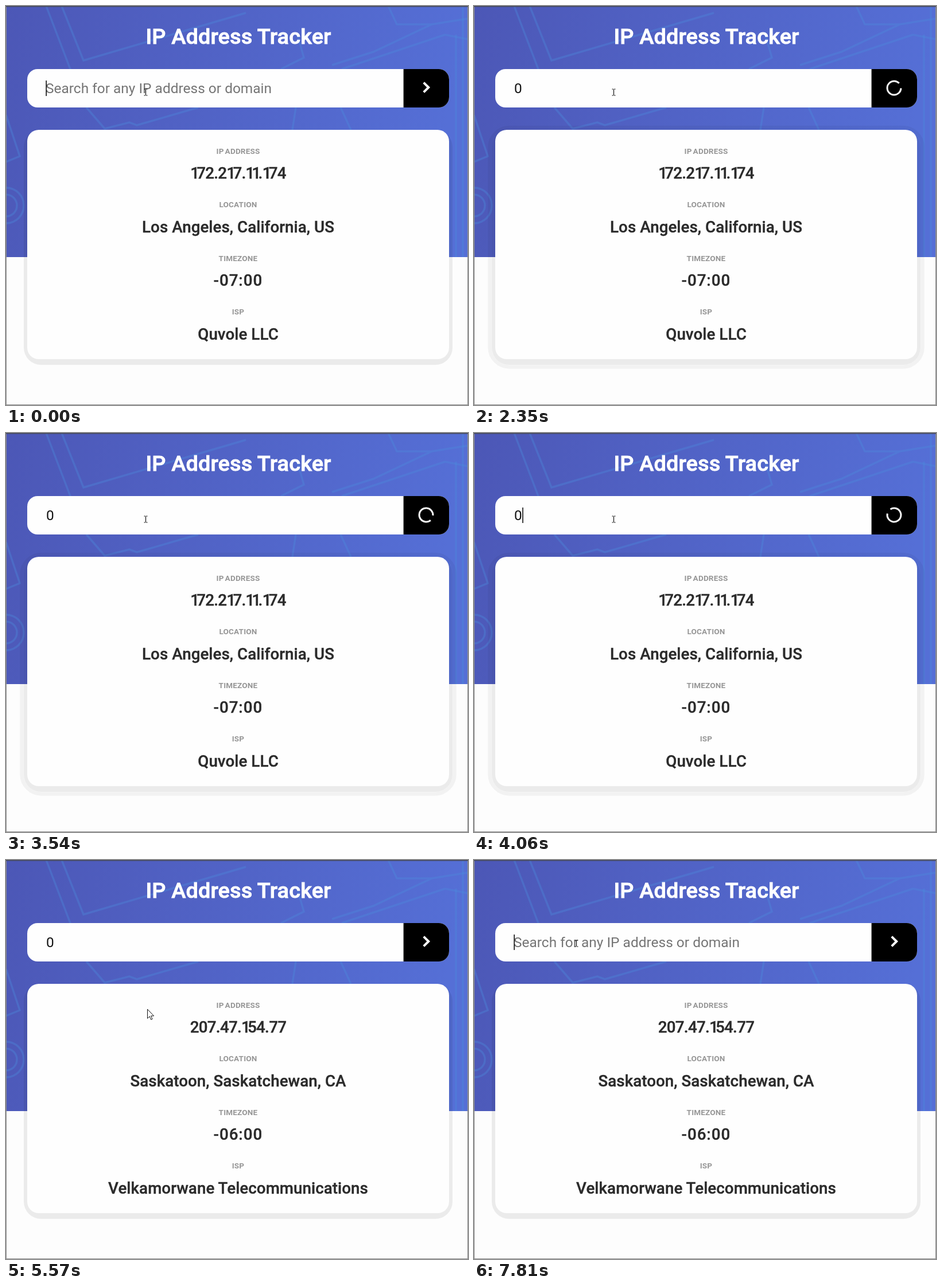
These frames come from a looping animation (805x696 px, 8000 ms). An HTML page:

```html
<!DOCTYPE html>
<html lang="en">
<head>
<meta charset="utf-8">
<title>IP Address Tracker</title>
<style>
html, body { margin: 0; width: 100%; height: 100%; overflow: hidden; background: #fdfdfd; }
svg { display: block; width: 805px; height: 696px; font-family: Roboto, Arial, sans-serif; }
.mid { text-anchor: middle; }
.title { font-size: 37.8px; font-weight: 500; letter-spacing: .15px; fill: #fff; stroke: #fff; stroke-width: .9px; }
.label { font-size: 13.5px; font-weight: 700; letter-spacing: .2px; word-spacing: -1.5px; fill: #969696; }
.value { font-size: 27.7px; font-weight: 500; letter-spacing: .08px; fill: #2b2b2b; stroke: #2b2b2b; stroke-width: .4px; }
.ip { letter-spacing: -.7px; }
.ip .one { letter-spacing: -.17em; }
.zone { letter-spacing: 1px; }
.field { font-size: 24.4px; letter-spacing: .03px; }
.map { fill: none; stroke: #4c8cdc; stroke-width: 3.5; stroke-opacity: .36; }
</style>
</head>
<body>
<svg viewBox="0 0 805 696">
  <defs>
    <linearGradient id="sky" x2="1" y2=".12">
      <stop offset="0" stop-color="#4c57b6"/>
      <stop offset=".35" stop-color="#5060c2"/>
      <stop offset="1" stop-color="#556fd6"/>
    </linearGradient>
  </defs>
  <rect width="805" height="696" fill="#fdfdfd"/>
  <rect width="805" height="438" fill="url(#sky)"/>
  <g class="map">
    <path d="M70 0L112 110M97 0L135 95L418 12M507 48L519 90L479 110"/>
    <path d="M0 190L24 262L0 272M140 177L172 214L215 203L228 208L335 177"/>
    <path d="M505 177L499 216M583 177L601 216"/>
    <path d="M568 103L640 80L742 32L805 22M585 110L765 50L805 58M666 0L681 32L742 32"/>
    <path d="M784 50V438M796 0V438"/>
    <circle cy="348" r="31"/>
    <circle cy="348" r="19"/>
  </g>

  <rect x="31" y="216" width="747" height="410" rx="30" fill-opacity=".07"/>
  <rect id="halo" x="27.5" y="212" width="754" height="417.5" rx="34"
        fill="none" stroke="#000" stroke-width="6.5" stroke-opacity=".045"/>
  <rect x="37" y="216" width="735" height="400" rx="20" fill="#fefefe"/>
  <text class="mid title" x="405" y="66">IP Address Tracker</text>
  <g id="card"></g>

  <rect x="37" y="110" width="735" height="67" rx="18" fill="#fefefe"/>
  <path d="M692.6 110H754A18 18 0 0 1 772 128V159A18 18 0 0 1 754 177H692.6Z"/>
  <path id="arrow" d="M727.8 133.6L736.2 142L727.8 150.4" fill="none" stroke="#fff" stroke-width="4"/>
  <circle id="ring" cx="732" cy="143" r="12" fill="none" stroke="#f4f4f4" stroke-width="3"
          pathLength="360" stroke-dasharray="315 45"/>
  <text id="hint" class="field" x="69" y="152" fill="#757575">Search for any IP address or domain</text>
  <text id="typed" class="field" x="70" y="152" fill="#111">0</text>
  <rect id="caret" y="130" width="1.5" height="27"/>

  <path d="M.5 0V696M804.5 0V696M0 695.5H805" stroke="#8c8c8c"/>
  <rect width="805" height="1.6" fill="#464a5c"/>

  <g id="mouse">
    <path id="beam" d="M-3-5.5H-.5M.5-5.5H3M0-5V5M-3 5.5H-.5M.5 5.5H3" stroke="#111" stroke-width="1.2"/>
    <path id="tip" d="M.5.5V16.5L4.2 13L6.6 18.6L9 17.6L6.6 12.1H11.6Z" fill="#fff" stroke="#111"/>
  </g>
</svg>
<script>
const $ = id => document.getElementById(id);
const LOOP = 8000, TYPED = 1590, SEND = 2350, DONE = 4420, CLEARED = 7490;
const STEP = 87;

const rows = [
  { label: 'IP ADDRESS', kind: 'ip', before: '172.217.11.174', after: '207.47.154.77' },
  { label: 'LOCATION', kind: '', before: 'Los Angeles, California, US', after: 'Saskatoon, Saskatchewan, CA' },
  { label: 'TIMEZONE', kind: 'zone', before: '-07:00', after: '-06:00' },
  { label: 'ISP', kind: '', before: 'Quvole LLC', after: 'Velkamorwane Telecommunications' }
];

// Each glide runs from the previous resting place; bow bends it sideways.
const home = { x: 243.5, y: 150.5 };
const glides = [
  { start: 4640, end: 4720, x: 246, y: 206, bow: 0 },
  { start: 5135, end: 5660, x: 246, y: 271, bow: 0 },
  { start: 5885, end: 6420, x: 197.5, y: 148.5, bow: 34 },
  { start: 7030, end: 7490, x: 178.5, y: 145.5, bow: 0 }
];

const text = (cls, y, s) => `<text class="mid ${cls}" x="404.5" y="${y}">${s}</text>`;
const tight = s => s.replace(/1/g, '<tspan class="one">1</tspan>');
const values = key => rows.map((r, i) =>
  text('value ' + r.kind, 301 + i * 93.6, r.kind === 'ip' ? tight(r[key]) : r[key])).join('');

$('card').innerHTML =
  rows.map((r, i) => text('label', 257.7 + i * 93.5, r.label)).join('') +
  ['before', 'after'].map(key => `<g id="${key}">${values(key)}</g>`).join('');

const show = (id, on) => { $(id).style.display = on ? '' : 'none'; };
const stepped = (t, from) => from + Math.floor((t - from) / STEP) * STEP;

// Typing restarts the blink, which then keeps a slightly slower beat.
function caretOn(t) {
  const beat = t < TYPED ? t / 490 : Math.max(0, (t - 1655) / 505);
  return Math.floor(beat) % 2 === 0;
}

function pointer(t) {
  let { x, y } = home;
  for (const g of glides) {
    if (t < g.start) break;
    const k = t >= g.end ? 1 : (stepped(t, g.start) - g.start) / (g.end - g.start);
    x += (g.x - x) * k + g.bow * Math.sin(Math.PI * k);
    y += (g.y - y) * k;
  }
  return { x, y };
}

function draw(t) {
  const typed = t >= TYPED && t < CLEARED;
  const busy = t >= SEND && t < DONE;
  show('hint', !typed);
  show('typed', typed);
  show('arrow', !busy);
  show('ring', busy);
  show('halo', busy);
  show('before', t < DONE);
  show('after', t >= DONE);

  show('caret', caretOn(t));
  $('caret').setAttribute('x', typed ? 84.3 : 69.4);

  const angle = stepped(t, SEND) * .36 - 124;
  $('ring').setAttribute('transform', `rotate(${angle} 732 143)`);

  const { x, y } = pointer(t);
  $('mouse').setAttribute('transform', `translate(${x} ${y})`);
  show('beam', y < 177);
  show('tip', y >= 177);
}

const start = performance.now();
function tick() {
  draw((performance.now() - start) % LOOP);
  requestAnimationFrame(tick);
}
tick();
</script>
</body>
</html>
```
